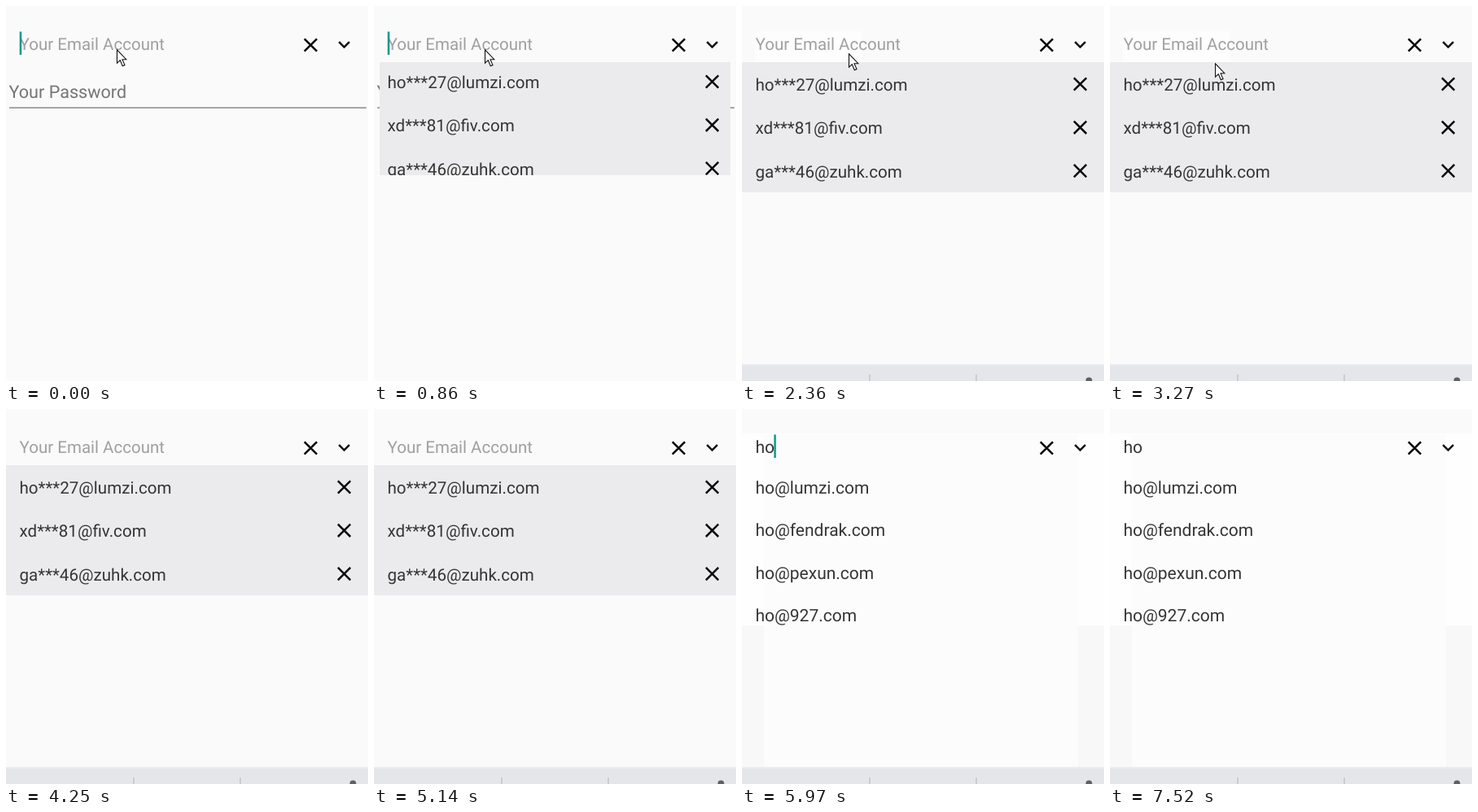
These frames come from a looping animation (445 px wide and 461 px high, 7990 ms). An HTML page:

```html
<!DOCTYPE html>
<html lang="en">
<head>
<meta charset="utf-8">
<title>Email field with suggestions</title>
<style>
  html, body { margin: 0; width: 100%; height: 100%; overflow: hidden; background: #fafafa; }
  svg { display: block; width: 445px; height: 461px; }
  text { font: 20.6px Roboto, sans-serif; fill: #353535; text-rendering: geometricPrecision; white-space: pre; }
  #hint { font-size: 20.5px; fill: #a0a0a0; }
  #password { font-size: 21.6px; fill: #757575; }
  #typed, #tips text { font-size: 21px; }
  .icon { fill: none; stroke: #0a0a0a; stroke-width: 2.5; }
</style>
</head>
<body>
<svg viewBox="0 0 445 461">
  <defs>
    <clipPath id="reveal"><rect id="window" y="69"/></clipPath>
    <path id="cross" class="icon" d="M-7.7-7.7 7.7 7.7M7.7-7.7-7.7 7.7"/>
  </defs>

  <rect width="445" height="461" fill="#fafafa"/>
  <text id="password" x="3.5" y="113">Your Password</text>
  <rect x="4" y="124.4" width="439" height="1.4" fill="#838383"/>

  <g id="tips">
    <rect y="30" width="445" height="236" fill="#fefefe"/>
    <rect y="266" width="445" height="175" fill="#f8f8f8"/>
    <rect id="tint" x="27" y="31" width="386" height="410" fill="#fcfcfc"/>
  </g>

  <rect id="patch" x="16" y="31" width="132" height="38" fill="#fdfdfd"/>
  <text id="hint" x="16.6" y="54">Your Email Account</text>
  <text id="typed" x="16.4" y="54"></text>
  <use href="#cross" x="374.5" y="48"/>
  <path class="icon" d="M409.3 44.2 415.7 50.6 422.1 44.2"/>

  <g clip-path="url(#reveal)">
    <g id="saved"><rect y="60" width="445" height="169" fill="#ebebed"/></g>
  </g>

  <g id="keyboard">
    <rect y="440" width="445" height="21" fill="#e4e6ea"/>
    <rect y="440" width="445" height="2" fill="#ececee"/>
    <g id="keys">
      <path d="M157 453V461M288 453V461" stroke="#c3c6cb" stroke-width="1.6"/>
      <rect x="422.6" y="456.4" width="7.8" height="12" rx="3.9" fill="#5c6167"/>
    </g>
  </g>

  <rect id="caret" y="31.5" width="2.5" height="28.5" fill="#13978a"/>
  <path id="mouse" d="M.5.8V17.2L4.3 13.7 7.3 20.8 10 19.6 7 12.7H11.8Z" fill="#fff" stroke="#111" stroke-width="1.1"/>
</svg>
<script>
const LOOP = 7990;
const $ = id => document.getElementById(id);
const NS = 'http://www.w3.org/2000/svg';

function add(parent, tag, attrs, label = '') {
  const el = document.createElementNS(NS, tag);
  place(el, attrs);
  el.textContent = label;
  return parent.appendChild(el);
}
function place(el, attrs) {
  for (const key in attrs) el.setAttribute(key, attrs[key]);
}
const show = (el, on) => { el.style.visibility = on ? 'visible' : 'hidden'; };

const hosts = ['lumzi', 'fendrak', 'pexun', '927'];
['ho***27@lumzi.com', 'xd***81@fiv.com', 'ga***46@zuhk.com'].forEach((mail, i) => {
  const y = 96 + i * 53.3;
  add($('saved'), 'text', { x: 16.5, y: y + 8 }, mail);
  add($('saved'), 'use', { href: '#cross', x: 415.7, y });
});
const tipRows = hosts.map((_, i) => add($('tips'), 'text', { x: 16.4, y: 104 + i * 52.4 }));

// Tracks hold [start, value]; a value stays until the next start.
const blink = [0, 300, 730, 1310, 1840, 2240, 2750, 3270, 3660, 4250, 4710, 5140, 5260, 6400, 6960, 7520]
  .map((t, i) => [t, i % 2 === 0]);
const mousePath = [[0, [136, 53]], [1310, [132, 57]], [2360, [131, 58]], [2480, [131, 59]],
  [2870, [130, 60]], [3000, [130, 61]], [3270, [129, 70]], [3390, [137, 240]],
  [3510, [150, 418]], [3660, null]];
// Left edge, bottom edge and vertical shift of the opening list.
const opening = [[0, null], [730, [20, 140, -8]], [860, [7, 208, -3]], [1010, [0, 229, 0]], [5260, null]];
const input = [[0, ''], [5260, 'h'], [5820, 'ho']];
const query = [[0, ''], [5260, 'h'], [5970, 'ho']];
const caretX = [16.7, 27.3, 39.3];

const at = (track, t) => track.findLast(step => step[0] <= t)[1];

function draw(now) {
  const t = now % LOOP;
  const word = at(input, t), tip = at(query, t);
  const list = at(opening, t), tipOf = at(mousePath, t);

  $('typed').textContent = word;
  show($('hint'), !word);
  place($('caret'), { x: caretX[word.length] });
  show($('caret'), at(blink, t));

  show($('tips'), tip);
  $('tint').style.opacity = word.length > 1 ? 1 : 0;
  tipRows.forEach((row, i) => { row.textContent = `${tip}@${hosts[i]}.com`; });

  show($('saved'), list);
  if (list) {
    const [left, bottom, shift] = list;
    place($('window'), { x: left, width: 445 - 2 * left, height: bottom - 69 });
    place($('saved'), { transform: `translate(0 ${shift})` });
  }

  show($('patch'), t >= 1310 && t < 3660);
  show($('keyboard'), t >= 1010);
  show($('keys'), t >= 1160);

  show($('mouse'), tipOf);
  if (tipOf) place($('mouse'), { transform: `translate(${tipOf})` });
}

const start = performance.now();
function tick() {
  draw(performance.now() - start);
  requestAnimationFrame(tick);
}
tick();
</script>
</body>
</html>
```
